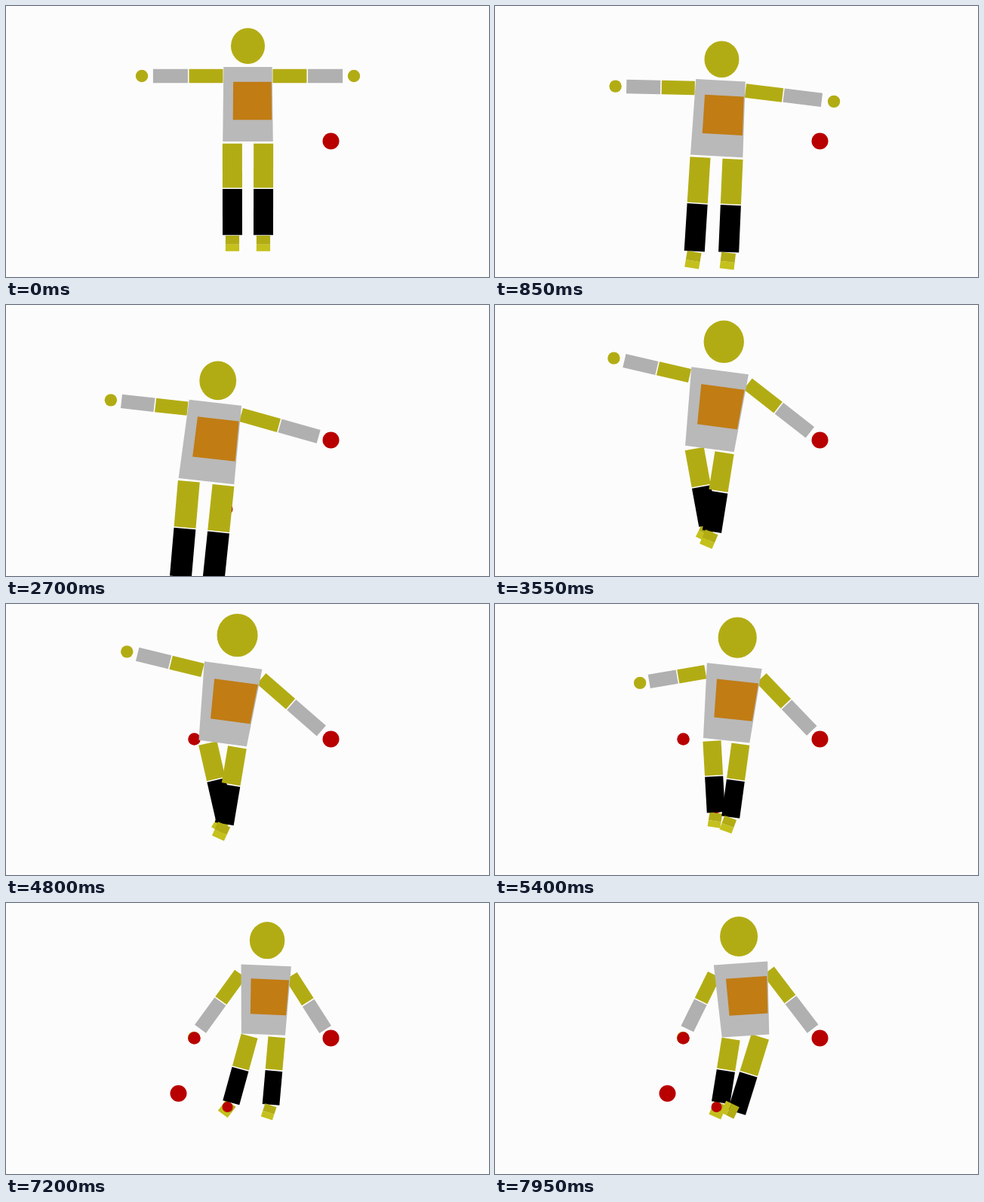
Recreate the animation shown at these times as an HTML page with a canvas. Size 640 by 360 pixels, loop 8 s.

```html
<!DOCTYPE html>
<html lang="en">
<head>
<meta charset="utf-8">
<title>Reaching figure</title>
<style>
  html, body { margin: 0; width: 100%; height: 100%; overflow: hidden; background: #fcfcfc; }
  canvas { display: block; width: 640px; height: 360px; }
</style>
</head>
<body>
<canvas id="stage" width="640" height="360"></canvas>
<script>
const ctx = document.getElementById('stage').getContext('2d');
const LOOP = 8000, STEP = 50;
const PAPER = '#fcfcfc', SKIN = '#b2ac14', SKIN_LIGHT = '#c4c01c', SLEEVE = '#b0b0b0',
      SHIRT = '#b9b9b9', EMBLEM = '#c17c14', SHIN = '#000', RED = '#b80000';

const mix = (a, b, k) => a + (b - a) * k;
const mixPoint = (a, b, k) => [mix(a[0], b[0], k), mix(a[1], b[1], k)];
const clamp = k => Math.max(0, Math.min(1, k));
const linear = k => k;
const smooth = k => k * k * (3 - 2 * k);
const power = n => k => k ** n;

// The body is carried by a few points; all else follows from them.
const rest = { neck: [320.5, 81], pelvis: [320.5, 180], hand: [180, 93],
  left: [300, 305], right: [341, 305], head: 22.5, leg: 26, kick: 0 };
const reach = { neck: [273.6, 137.5], pelvis: [262, 242], hand: [135.5, 136.5],
  left: [222, 374], right: [272.6, 378], head: 24, leg: 29.6, kick: 0 };
const stand = { neck: [301, 81.5], pelvis: [287, 185], hand: [160, 63],
  left: [290, 284], right: [289, 293], head: 27, leg: 25, kick: 0 };
const settle = { neck: [346, 83], pelvis: [341.5, 174.5], hand: [249, 179],
  left: [298, 266], right: [353, 268], head: 23.1, leg: 22.6, kick: 0 };
const stride = { neck: [325.5, 80], pelvis: [332, 176.5], hand: [249, 179],
  left: [299, 266], right: [320, 279], head: 25, leg: 24.5, kick: 1.33 };

const moves = [
  { from: rest, to: reach, start: 400, end: 1550, easeX: power(0.83), easeY: power(1.24) },
  { from: reach, to: stand, start: 2350, end: 3850, easeX: smooth, easeY: smooth },
  { from: stand, to: settle, start: 4750, end: 6350, easeX: smooth, easeY: smooth },
  { from: settle, to: stride, start: 7150, end: 7950, easeX: linear, easeY: linear }
];

const balls = [
  { x: 430.5, y: 179.5, r: 11, shown: 0 },
  { x: 293.5, y: 271, r: 7, shown: 2400 },
  { x: 249.5, y: 179.5, r: 8.3, shown: 4800 },
  { x: 228.5, y: 253, r: 11, shown: 7200 }
];

function poseAt(t) {
  const { from, to, start, end, easeX, easeY } = moves.findLast(m => t >= m.start) || moves[0];
  const k = clamp((t - start) / (end - start)), kx = easeX(k), ky = easeY(k);
  const blend = (a, b) => Array.isArray(a) ? [mix(a[0], b[0], kx), mix(a[1], b[1], ky)] : mix(a, b, ky);
  return Object.fromEntries(Object.keys(from).map(key => [key, blend(from[key], to[key])]));
}

// The free hand goes straight to the first ball and stays there.
function leadingHand(t) {
  const { start, end } = moves[0];
  return mixPoint([461, 93], [balls[0].x, balls[0].y], clamp((t - start) / (end - start)));
}

function unit(a, b) {
  const dx = b[0] - a[0], dy = b[1] - a[1], len = Math.hypot(dx, dy) || 1;
  return [dx / len, dy / len];
}

// Point beside p, measured across and along the direction `down`
const offset = (p, down, across, along) =>
  [p[0] + down[1] * across + down[0] * along, p[1] - down[0] * across + down[1] * along];

function polygon(points, fill) {
  ctx.fillStyle = fill;
  ctx.beginPath();
  points.forEach(p => ctx.lineTo(...p));
  ctx.closePath();
  ctx.fill();
}

function disc(x, y, r, fill, stretch = 1) {
  ctx.fillStyle = fill;
  ctx.beginPath();
  ctx.ellipse(x, y, r, r * stretch, 0, 0, Math.PI * 2);
  ctx.fill();
}

function limb(a, b, width, fill, gap = 0.8) {
  const d = unit(a, b), h = width / 2;
  polygon([offset(a, d, -h, gap), offset(a, d, h, gap), offset(b, d, h, -gap), offset(b, d, -h, -gap)], fill);
}

function drawArm({ shoulder, hand }) {
  const elbow = mixPoint(shoulder, hand, 0.43);
  limb(shoulder, elbow, 18.5, SKIN);
  limb(elbow, mixPoint(shoulder, hand, 0.87), 18.5, SLEEVE);
}

function drawLeg({ hip, ankle }, width) {
  const knee = mixPoint(hip, ankle, 0.49);
  limb(hip, knee, width, SKIN);
  limb(knee, ankle, width, SHIN);
}

// The foot leans further out than the leg above it.
function drawFoot({ hip, ankle }, legWidth, turn = 0) {
  const slope = Math.abs((ankle[0] - hip[0]) / (ankle[1] - hip[1]));
  const angle = Math.PI / 2 + Math.atan(2.7 * slope) + turn;
  const down = [Math.cos(angle), Math.sin(angle)];
  const ridge = offset(ankle, down, 0, legWidth * 0.45), toe = offset(ankle, down, 0, legWidth * 0.8);
  limb(ankle, ridge, legWidth * 0.7, SKIN, 0);
  limb(ridge, toe, legWidth * 0.7, SKIN_LIGHT, 0);
}

function draw(t) {
  const { neck, pelvis, hand, left, right, head, leg, kick } = poseAt(t);
  const down = unit(neck, pelvis), top = head * 1.43, bottom = leg * 1.28;
  const arms = [
    { shoulder: offset(neck, down, -top, 12), hand },
    { shoulder: offset(neck, down, top, 12), hand: leadingHand(t) }
  ];
  const legs = [
    { hip: offset(pelvis, down, -bottom * 0.62, 2), ankle: left },
    { hip: offset(pelvis, down, bottom * 0.62, 2), ankle: right }
  ];
  const onTorso = (u, v) => offset(mixPoint(neck, pelvis, v), down, u * mix(top, bottom, v), 0);
  const patch = (u0, v0, u1, v1) => [onTorso(u0, v0), onTorso(u1, v0), onTorso(u1, v1), onTorso(u0, v1)];

  ctx.fillStyle = PAPER;
  ctx.fillRect(0, 0, 640, 360);

  arms.forEach(a => disc(...a.hand, 8.2, SKIN));
  drawFoot(legs[0], leg);
  balls.filter(b => t >= b.shown).forEach(b => disc(b.x, b.y, b.r, RED));
  arms.forEach(drawArm);
  legs.forEach(l => drawLeg(l, leg));
  drawFoot(legs[1], leg, kick);

  polygon(patch(-1, 0, 1, 1), SHIRT);
  polygon(patch(-0.6, 0.2, 0.96, 0.71), EMBLEM);

  // A head nearer to the viewer also stands further off the neck.
  const lift = head * (0.2 + 1.2 * head / leg);
  disc(...offset(neck, down, 0, -lift), head, SKIN, 1.06);
}

function tick() {
  const t = performance.now() % LOOP;
  draw(Math.floor(t / STEP) * STEP);
  requestAnimationFrame(tick);
}
tick();
</script>
</body>
</html>
```
